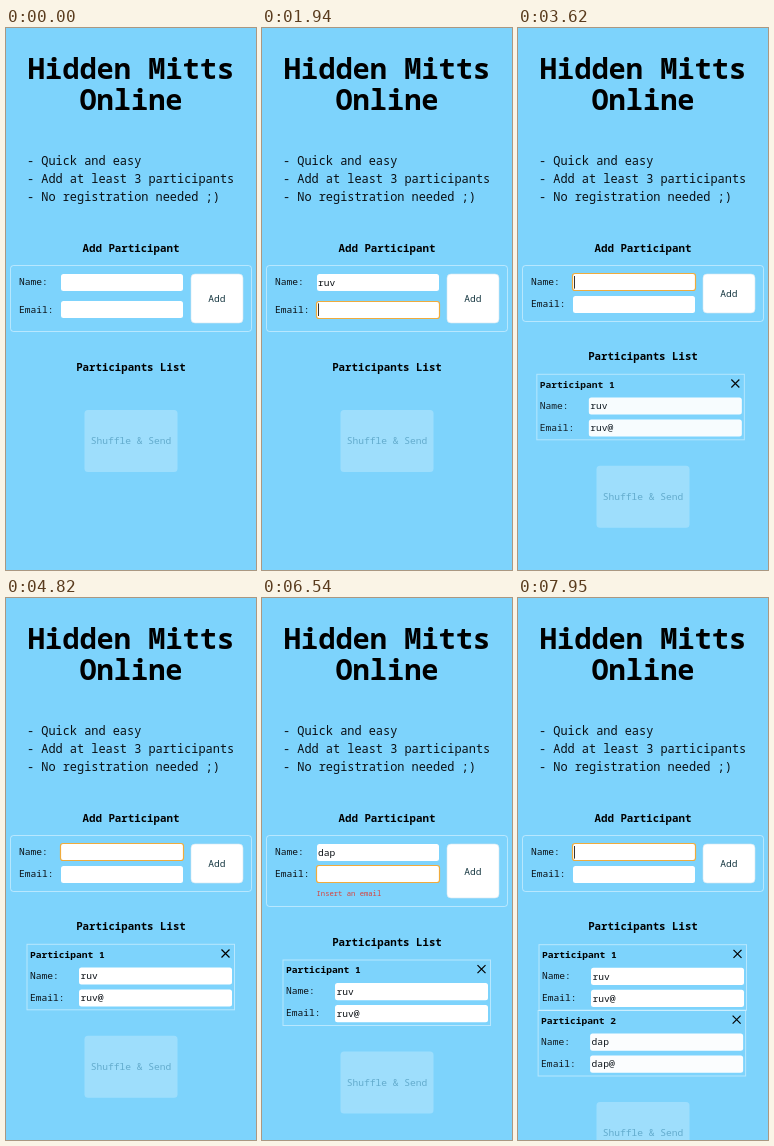
These frames come from a looping animation (250 by 542 pixels, 8000 ms). An HTML page:

```html
<!DOCTYPE html>
<html lang="en">
<meta charset="utf-8">
<title>Gift draw form</title>
<style>
  html, body { margin: 0; width: 100%; height: 100%; overflow: hidden; background: #7dd3fc; }
  svg { display: block; }
  text { font-family: "Noto Sans Mono", monospace; white-space: pre; fill: #0a0f14; }
  .bold { font-weight: 600; fill: #000; }
  .mid { text-anchor: middle; }
  .label { fill: #173842; text-anchor: middle; }
  .error { fill: #d8423c; }
  .frame { fill: none; stroke: #fff; stroke-opacity: .45; }
  .white { fill: #fff; }
  .button { fill: #fff; stroke: #d3e6f0; stroke-width: .6; }
  .focus { fill: #fff; stroke: #f0ab3c; stroke-width: 1.2; }
  .icon { stroke: #000; stroke-width: 1.2; }
</style>
<svg id="stage" width="250" height="542" viewBox="0 0 250 542"></svg>
<script>
const LOOP = 8000, BLINK = 516, MOVE = 500, SLIDE = -37;
const CHAR = 5.76, CARD_PITCH = 66.2, ERROR_AT = 5610, ERROR_HEIGHT = 15.7;

// One round per participant: focus, typing times, tab to the email field, submit.
const rounds = [
  { word: 'ruv', focus: 374, name: [1220, 1350, 1480], tab: 1940, mail: [2340, 2440, 2540, 2810], submit: 3270 },
  { word: 'dap', focus: 3270, name: [4950, 5080, 5280], tab: 6010, mail: [6620, 6700, 6800, 7200], submit: 7550 },
  { word: '', focus: 7550, name: [], tab: Infinity, mail: [], submit: Infinity }
];

const stage = document.getElementById('stage');

// CSS "ease": cubic-bezier(.25, .1, .25, 1)
function ease(x) {
  if (x <= 0) return 0;
  if (x >= 1) return 1;
  const bezier = (a, b, s) => 3 * (1 - s) ** 2 * s * a + 3 * (1 - s) * s * s * b + s ** 3;
  let low = 0, high = 1;
  for (let i = 0; i < 20; i++) {
    const s = (low + high) / 2;
    if (bezier(.25, .25, s) < x) low = s; else high = s;
  }
  return bezier(.1, 1, low);
}

const text = (x, y, advance, content, cls = '') =>
  `<text x="${x}" y="${y}" font-size="${advance / .6}" class="${cls}">${content}</text>`;

const rect = (x, y, w, h, cls, r = 2.5) =>
  `<rect x="${x}" y="${y}" width="${w}" height="${h}" rx="${r}" class="${cls}"/>`;

const typed = (word, times, t) => word.slice(0, times.filter(at => at <= t).length);

// Boxes snap to whole pixels, as a browser lays them out.
function input(y, value, focused, caretOn) {
  const caretX = 56.2 + value.length * CHAR;
  const box = focused
    ? rect(54.5, Math.floor(y) + .5, 123, 17, 'focus')
    : rect(55, Math.round(y), 122, 17, 'white');
  return box + text(56, y + 11.9, CHAR, value) +
    (focused && caretOn ? `<rect x="${caretX}" y="${y + 2.3}" width=".8" height="12.6"/>` : '');
}

function card(index, word, dy, progress) {
  const x = SLIDE * (1 - progress);
  const y = 346 + index * CARD_PITCH + dy;
  return `<g transform="translate(${x} ${y})" opacity="${progress}">` +
    rect(21, .3, 207.5, 65.5, 'frame', 0) +
    text(24, 13.5, CHAR, 'Participant ' + (index + 1), 'bold') +
    '<path class="icon" d="M215.5 5.5l8 8m0-8l-8 8"/>' +
    text(24, 34.5, CHAR, 'Name:') + rect(73, 23.4, 153, 17.2, 'white') + text(74.5, 35.3, CHAR, word) +
    text(24, 56.5, CHAR, 'Email:') + rect(73, 45.4, 153, 17.2, 'white') + text(74.5, 57.3, CHAR, word + '@') +
    '</g>';
}

function scene(t) {
  const count = rounds.filter(r => r.submit <= t).length;
  const round = rounds[count];
  const focus = t < round.focus ? '' : t < round.tab ? 'name' : 'mail';
  const lastInput = Math.max(0, ...[round.focus, round.tab, ...round.name, ...round.mail].filter(at => at <= t));
  const caretOn = Math.floor((t - lastInput) / BLINK) % 2 === 0;

  const gap = count ? 0 : 5.3;
  const error = t >= ERROR_AT && t < rounds[1].submit;
  const shift = error ? ERROR_HEIGHT : 2 * gap;
  const progress = rounds.map(r => ease((t - r.submit) / MOVE));

  const intro = ['Quick and easy', 'Add at least 3 participants', 'No registration needed ;)'];
  let out = text(125, 50.5, 17.2, 'Hidden Mitts', 'bold mid') + text(125, 81.5, 17.2, 'Online', 'bold mid') +
    intro.map((line, i) => text(21, 137 + 18 * i, 7.15, '- ' + line)).join('');

  out += text(125, 224, 6.45, 'Add Participant', 'bold mid') +
    rect(4.5, 237.5, 241, Math.floor(56.2 + shift), 'frame', 3) +
    text(13, 257.2, CHAR, 'Name:') +
    input(245.7, typed(round.word, round.name, t), focus === 'name', caretOn) +
    text(13, 279.2 + gap, CHAR, 'Email:') +
    input(267.8 + gap, typed(round.word + '@', round.mail, t), focus === 'mail', caretOn) +
    (error ? text(54.5, 297.5, 4.32, 'Insert an email', 'error') : '') +
    rect(185, 246, 52, Math.floor(39.2 + shift), 'button', 4) +
    text(211, 268.7 + shift / 2, CHAR, 'Add', 'label');

  out += text(125, 332.3 + shift, 6.45, 'Participants List', 'bold mid');
  for (let i = 0; i < count; i++) {
    const slide = i === 0 && count === 2 ? ERROR_HEIGHT * (1 - progress[1]) : 0;
    out += card(i, rounds[i].word, (error ? shift : 0) + slide, progress[i]);
  }

  const shuffleY = 371.5 + shift + CARD_PITCH * count;
  return out + '<g opacity=".25">' + rect(78.5, shuffleY, 93, 62, 'white', 3.5) +
    text(125, shuffleY + 34.3, CHAR, 'Shuffle &amp; Send', 'label') + '</g>';
}

let shown;
function draw() {
  const next = scene(performance.now() % LOOP);
  if (next !== shown) stage.innerHTML = shown = next;
  requestAnimationFrame(draw);
}
draw();
</script>
</html>
```
